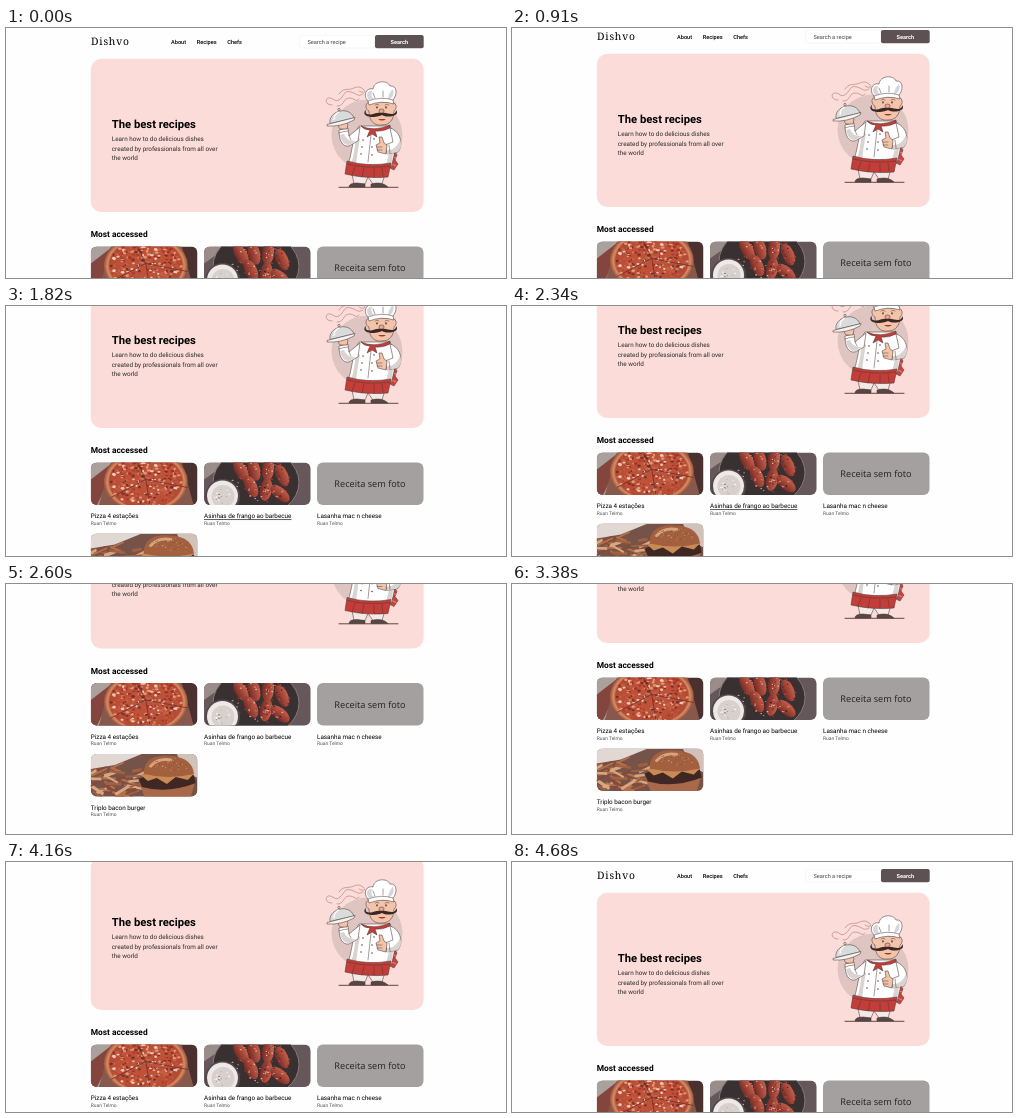
These frames come from a looping animation (500x250 px, 6.24 s). An HTML page:

```html
<!DOCTYPE html>
<html lang="en">
<head>
<meta charset="utf-8">
<title>Recipes</title>
<style>
html, body { margin: 0; width: 100%; height: 100%; overflow: hidden; background: #fefefe; }
svg { display: block; width: 100%; height: 100%; }
text { font-family: Roboto, sans-serif; font-size: 5.62px; fill: #000; text-rendering: geometricPrecision; }
.logo { font: 10.3px "Noto Serif", serif; letter-spacing: .8px; }
.nav { font-weight: 500; }
.h1 { font-size: 11.25px; font-weight: 700; }
.h2 { font-size: 8.4px; font-weight: 700; }
.lead { font-size: 6.33px; fill: #2b2b2b; }
.name { font-size: 6.33px; }
.by { font-size: 4.92px; fill: #555; }
.blank { font: 9.2px "Open Sans", sans-serif; fill: #222; }
.line { fill: none; stroke: #4b3836; stroke-width: .5; stroke-linecap: round; }
.ink { stroke: #4b3836; stroke-width: .55; stroke-linejoin: round; }
</style>
</head>
<body>
<svg viewBox="0 0 500 250">
  <defs>
    <clipPath id="frame"><rect width="106.5" height="42.5" rx="6"/></clipPath>
    <radialGradient id="crust">
      <stop offset=".5" stop-color="#bd5239"/><stop offset=".86" stop-color="#b54a33"/>
      <stop offset=".91" stop-color="#d58e66"/><stop offset="1" stop-color="#9c5038"/>
    </radialGradient>
    <linearGradient id="wing" x2="0" y2="1">
      <stop stop-color="#c95f4a"/><stop offset="1" stop-color="#752a25"/>
    </linearGradient>
  </defs>

  <g id="page">
    <text class="logo" x="85" y="17.3">Dishvo</text>
    <text class="nav" x="165" y="15.8">About</text>
    <text class="nav" x="190.7" y="15.8">Recipes</text>
    <text class="nav" x="221.3" y="15.8">Chefs</text>
    <rect x="293.5" y="7.3" width="75" height="12.6" rx="2" fill="#fff" stroke="#eee" stroke-width=".5"/>
    <text x="301.5" y="15.8" style="fill:#444">Search a recipe</text>
    <rect x="369" y="7" width="48.7" height="13.2" rx="2" fill="#5d5153"/>
    <text x="393.4" y="15.7" text-anchor="middle" style="fill:#fff;font-weight:700">Search</text>

    <rect x="84.8" y="30.8" width="332.8" height="153.2" rx="10.5" fill="#fbdcd8"/>
    <text class="h1" x="105.8" y="100">The best recipes</text>
    <text class="lead" x="105.8" y="113.4">Learn how to do delicious dishes</text>
    <text class="lead" x="105.8" y="122.6">created by professionals from all over</text>
    <text class="lead" x="105.8" y="131.8">the world</text>

    <g id="chef">
      <circle cx="361" cy="107" r="35.5" fill="#dec5c2"/>
      <path class="line" style="stroke-width:.9" d="M333 159.3H392"/>
      <path class="line" style="stroke:#9d625e" d="M326 77C318 77 319 69 324 70S329 75 334 71S338 62 345 64S351 69 357 66M331 78C338 79 337 70 343 70S350 75 353 71M333 66C337 60 341 62 345 61S352 57 357 61S355 65 353 63"/>
      <!-- towel, legs, shoes -->
      <path class="ink" fill="#c9443f" d="M383 126Q389 122 391 127L389 132L392 136L388 142L384 140L386 135L383 132z"/>
      <path class="line" style="stroke:#f3d5d0" d="M385 128L390 130M386 136L390 138"/>
      <path class="ink" fill="#f3e9e7" d="M346 146L348 156H359L362 149L367 156H376L379 146z"/>
      <path class="ink" fill="#594745" d="M343 159Q343 155 351 155L359 156V159zM365 159V156Q376 153 382 159z"/>
      <!-- jacket and apron -->
      <path class="ink" fill="#fff" d="M353 98C347 106 347 121 342 137L385 139C390 124 391 108 384 98z"/>
      <path d="M350 107Q349 124 345 136L350 137Q352 120 354 111zM384 122L380 137L385 138Q387 130 387 122z" fill="#d9d3d2"/>
      <path class="ink" fill="#c33d39" d="M341 133Q362 139 385 135L382 149Q360 151 339 146z"/>
      <path class="line" d="M341 136Q362 141 384 138M349 139L346 147M358 140L356 149M368 141V149M376 140L377 148"/>
      <!-- raised arm with platter -->
      <path class="ink" fill="#fff" d="M354 99L343 108L342 100L333 102C333 112 336 119 343 118L352 113z"/>
      <path d="M334 107Q336 117 343 117L350 113Q341 114 338 106z" fill="#d9d3d2"/>
      <path class="line" d="M333 105Q338 103 342 103M343 108L345 112"/>
      <path class="ink" fill="#f3c3aa" d="M334 101L331 96L339 93L342 96L341 101z"/>
      <path class="ink" fill="#d9dcdb" d="M324 95.5C322 83 343 77 348 90z"/>
      <path class="ink" fill="#f4f4f2" d="M321 96.5L349 89.5L348 92Q335 99 321 98z"/>
      <circle class="ink" cx="333" cy="81.5" r="1.2" fill="#ddd"/>
      <path d="M328 92Q328 86 333 84" fill="none" stroke="#fff" stroke-width="1.3"/>
      <!-- bent arm with thumb up -->
      <path class="ink" fill="#fff" d="M384 100C394 103 398 116 392 124L381 126L379 117L387 114z"/>
      <path d="M394 112Q397 120 391 124L381 126V122Q390 122 394 112z" fill="#d9d3d2"/>
      <path class="ink" fill="#f3c3aa" d="M380 126L372 124L370 117L374 115L373 109L376 109L378 115L381 117z"/>
      <path class="line" d="M371 119H376M371 122H376M365 107L362 134M383 117L384 125"/>
      <path d="M357 112v.1M356 119v.1M355 126v.1M368 111v.1M366 119v.1M366 127v.1" stroke="#4b3836" stroke-width="1.5" stroke-linecap="round"/>
      <!-- head -->
      <path class="ink" fill="#f3c3aa" d="M363 74C358 76 360 82 363 83C363 94 369 98 376 97C384 97 388 91 388 83C391 81 391 76 387 74z"/>
      <path class="ink" fill="#c33d39" d="M355 98Q368 104 384 97L384 100Q377 104 369 103L371 109L366 106L361 109L364 102Q358 102 355 98z"/>
      <path class="ink" fill="#fff" d="M362 73C356 67 361 59 367 61C368 52 382 52 384 58C392 57 391 68 387 72L388 76Q376 72 363 77z"/>
      <path d="M363 72C359 67 362 62 366 63Q364 68 368 71zM384 71Q389 67 387 61Q383 64 382 71z" fill="#d5d6d9"/>
      <path class="line" d="M362 73Q375 68 387 72M369 70L367 65M377 69V63M369 77Q371 75 373 77M379 77Q381 75 383 77"/>
      <path d="M371 79v.8M380 79v.8" stroke="#2d2020" stroke-width="1.3" stroke-linecap="round"/>
      <path d="M375 85C369 84 367 88 361 86Q359 85 360 82C357 84 358 88 363 88.5C369 90 373 88 376 87C380 89 385 89 389 87C392 86 391 83 390 82Q390 86 386 86C382 86 380 84 375 85z" fill="#3b2724"/>
      <ellipse class="ink" cx="375.5" cy="83" rx="2.6" ry="2" fill="#eba993"/>
      <path d="M372 91Q376 94 380 91z" fill="#9c3735"/>
    </g>

    <text class="h2" x="84.7" y="209.3">Most accessed</text>

    <g transform="translate(84.8 218.5)" clip-path="url(#frame)">
      <rect width="107" height="43" fill="#4a312f"/>
      <path d="M0 0H29L8 43H0z" fill="#aaa09c"/>
      <path d="M0 17L22 0H27L6 43H0z" fill="#85453f"/>
      <path d="M20 0H91L103 43H8z" fill="#87594c"/>
      <ellipse cx="55" cy="19" rx="42" ry="31" fill="url(#crust)"/>
      <g id="pizza"></g>
      <path d="M55 17L20 35M55 17L97 25M55 17L44 -5M55 17L60 48" stroke="#6d3028" stroke-width=".8"/>
    </g>

    <g transform="translate(198 218.5)" clip-path="url(#frame)">
      <rect width="107" height="43" fill="#65575a"/>
      <path d="M0 0H24L0 17z" fill="#9a8c89"/>
      <ellipse cx="52" cy="20" rx="43" ry="34" fill="#393032" stroke="#87797a" stroke-width="1"/>
      <g id="wings"></g>
      <circle cx="18.5" cy="34" r="17.5" fill="#50484a"/>
      <circle cx="18.5" cy="33.5" r="15.5" fill="#eee8e6"/>
      <circle cx="19" cy="34" r="11.5" fill="#d8d0cd"/>
      <g id="herbs"></g>
    </g>

    <g transform="translate(311 218.5)">
      <rect width="106.5" height="42.5" rx="6" fill="#a3a09f"/>
      <text class="blank" x="53" y="24.7" text-anchor="middle">Receita sem foto</text>
    </g>

    <g transform="translate(84.8 289.5)" clip-path="url(#frame)">
      <rect width="107" height="43" fill="#765348"/>
      <path d="M0 0H51L24 11L0 15z" fill="#e1d8d4"/>
      <path d="M86 0H107V24L94 18z" fill="#d0c2bb"/>
      <g id="fries"></g>
      <path d="M49 31Q75 39 104 29L100 43H54z" fill="#a8694a"/>
      <path d="M48 25L60 20L103 21L105 29Q77 40 51 33z" fill="#3f2724"/>
      <path d="M50 21L71 17L104 19L97 26L85 23L76 30L66 24L57 27z" fill="#c98a54"/>
      <path d="M53 20C53 5 64 1 78 2C94 2 103 10 103 20Q78 26 53 20z" fill="#a2603f"/>
      <path d="M60 12Q67 4 80 6" fill="none" stroke="#d6a57f" stroke-width="3" stroke-linecap="round"/>
      <g id="bun"></g>
    </g>
    <g id="labels"></g>
  </g>
</svg>
<script>
const $ = id => document.getElementById(id);

function add(parent, tag, attrs, text = "") {
  const el = document.createElementNS("http://www.w3.org/2000/svg", tag);
  for (const key in attrs) el.setAttribute(key, attrs[key]);
  el.textContent = text;
  return $(parent).appendChild(el);
}

let seed = 7;
const rand = (a, b) => {
  seed = (seed * 16807) % 2147483647;
  return a + (b - a) * seed / 2147483647;
};

// Small blobs spread over an ellipse
function scatter(parent, count, cx, cy, rx, ry, size, colors) {
  for (let i = 0; i < count; i++) {
    const a = rand(0, 2 * Math.PI), r = Math.sqrt(rand(0, 1));
    add(parent, "ellipse", {
      cx: cx + rx * r * Math.cos(a), cy: cy + ry * r * Math.sin(a),
      rx: size * rand(.6, 1.4), ry: size * rand(.4, 1), fill: colors[i % colors.length]
    });
  }
}

scatter("pizza", 330, 55, 19, 36, 26, 1.4, ["#a53427", "#df9c78", "#c9523a", "#eccab4", "#7a2f28", "#c4634a"]);
for (const [x, y, turn] of [[37, 8, 60], [50, 7, 75], [64, 7, 95], [78, 13, 65], [47, 24, 65], [62, 27, 100], [76, 31, 40]]) {
  add("wings", "ellipse", { cx: x, cy: y, rx: 11.5, ry: 6, fill: "url(#wing)", transform: `rotate(${turn} ${x} ${y})` });
}
scatter("wings", 120, 58, 18, 30, 22, .8, ["#d98a72", "#8f372e", "#e8c1ae", "#4a2220", "#b34b3b"]);
scatter("herbs", 18, 19, 34, 9, 8, .7, ["#857d78", "#fff"]);
for (let i = 0; i < 44; i++) {
  const x = rand(-5, 46), y = rand(12, 42);
  add("fries", "path", {
    d: `M${x} ${y}l${rand(9, 17)} ${rand(-9, 10)}`, "stroke-width": rand(1.6, 3.2),
    stroke: ["#b87049", "#84493a", "#d9a67f", "#a3603f"][i % 4]
  });
}
scatter("bun", 40, 78, 11, 20, 7, .6, ["#d9ab88", "#7f4730"]);

function label(x, y, title) {
  add("labels", "text", { class: "by", x, y: y + 6.5 }, "Ruan Telmo");
  return add("labels", "text", { class: "name", x, y }, title);
}
label(84.8, 274.4, "Pizza 4 estações");
const hovered = label(198, 274.4, "Asinhas de frango ao barbecue");
label(311, 274.4, "Lasanha mac n cheese");
label(84.8, 345.4, "Triplo bacon burger");

const LOOP = 6240, STEP = 130;
// [time, scroll offset]
const keys = [
  [0, 0], [780, 0], [910, 5], [1040, 13], [1690, 59], [1820, 62],
  [2210, 62], [2340, 72], [2600, 119.5], [2730, 126], [2860, 128],
  [3250, 128], [3380, 125], [3510, 117], [3640, 104], [4160, 36],
  [4290, 19], [4420, 5], [4679, 5], [4680, 0], [LOOP, 0]
];

function scrollAt(t) {
  const i = keys.findIndex(k => k[0] > t);
  const [t0, y0] = keys[i - 1], [t1, y1] = keys[i];
  return y0 + (y1 - y0) * (t - t0) / (t1 - t0);
}

function draw(now) {
  const t = Math.floor(now % LOOP / STEP) * STEP;
  $("page").setAttribute("transform", `translate(0 ${-scrollAt(t)})`);
  hovered.style.textDecoration = t >= 1560 && t < 2470 ? "underline" : "none";
  requestAnimationFrame(draw);
}
draw(performance.now());
</script>
</body>
</html>
```
